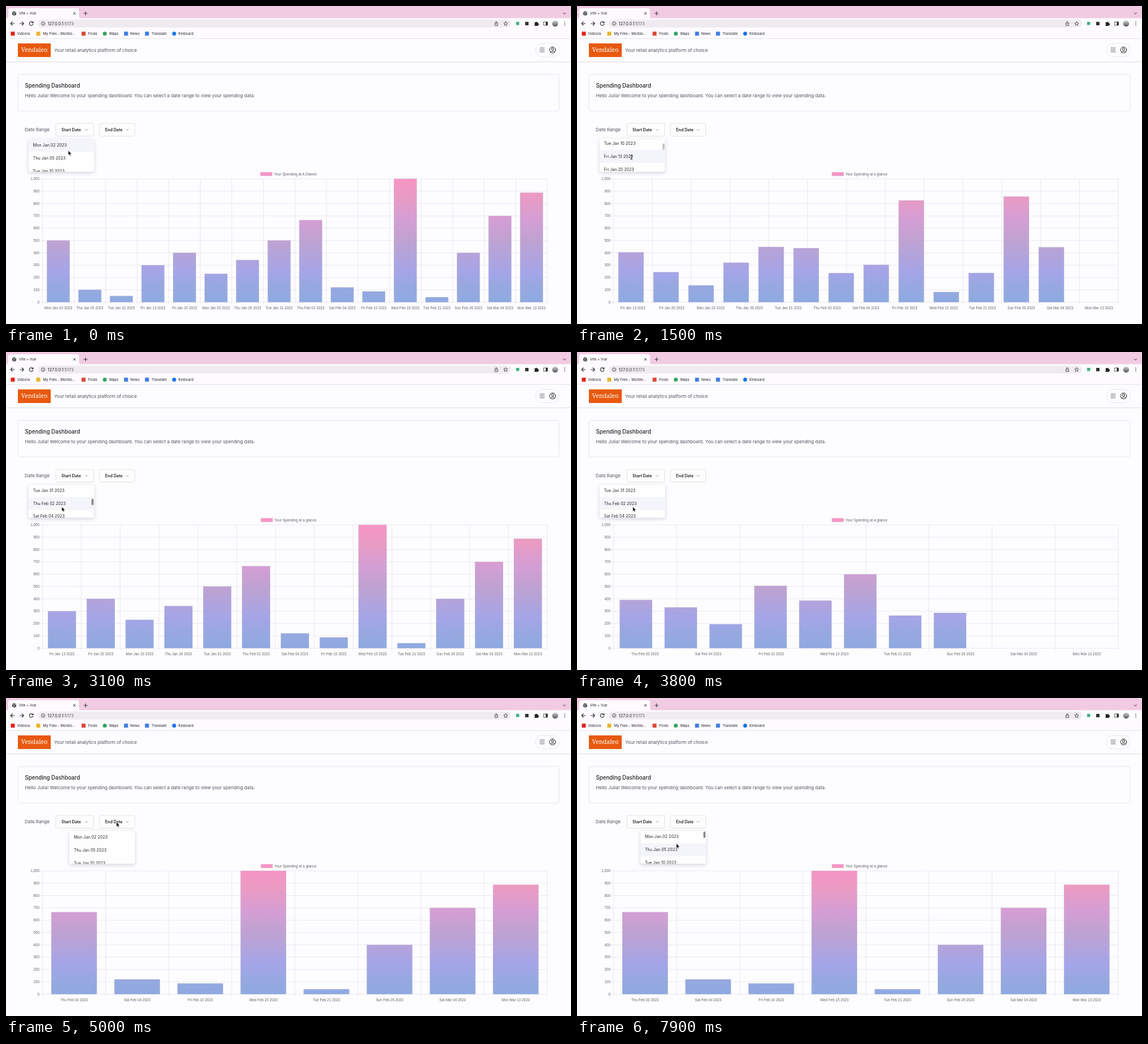
Write an HTML page that moves like this. It is 998 by 561 pixels and loops after 8 s.

```html
<!DOCTYPE html>
<html lang="en">
<head>
<meta charset="utf-8">
<title>Spending Dashboard</title>
<style>
  html, body { margin: 0; width: 100%; height: 100%; overflow: hidden; background: #fdfcff; }
  svg { display: block; font-family: Inter, "Open Sans", sans-serif; fill: #222; }
  .line { fill: none; stroke: #333; stroke-linecap: round; stroke-linejoin: round; }
  .chrome { font-size: 6.2px; }
  .body { font-size: 8.05px; fill: #50555f; }
  .button rect { fill: #fefdfd; stroke: #dddcd3; stroke-width: .8; }
  .button text { font-size: 7.15px; font-weight: 600; }
  .button path { stroke: #888; stroke-width: .8; }
  .menu text { font-size: 7.1px; }
  .panel { fill: #fefeff; filter: drop-shadow(0 2px 3px rgba(40, 40, 70, .2)); }
  .hover { fill: #f4f4fb; }
  .thumb { fill: #89878c; }
  .chart { font: 6.35px "Liberation Sans", Arial, sans-serif; }
  .chart text { fill: #666; }
  .grid { stroke: #dcdbe3; stroke-width: .6; }
  .bar { fill: url(#spend); stroke: #b4aec8; stroke-opacity: .55; stroke-width: .6; }
</style>
</head>
<body>
<svg id="stage" width="998" height="561" viewBox="0 0 998 561">
  <defs>
    <linearGradient id="spend" gradientUnits="userSpaceOnUse" x1="0" y1="305" x2="0" y2="522.5">
      <stop offset="0" stop-color="#f795c4"/>
      <stop offset=".14" stop-color="#ea9bc3"/>
      <stop offset=".34" stop-color="#d39ed5"/>
      <stop offset=".5" stop-color="#bfa2d1"/>
      <stop offset=".77" stop-color="#a3a5e8"/>
      <stop offset=".88" stop-color="#97a8df"/>
      <stop offset="1" stop-color="#8eaae1"/>
    </linearGradient>
    <linearGradient id="photo" x2="0" y2="1">
      <stop stop-color="#cfcfd2"/><stop offset="1" stop-color="#55565a"/>
    </linearGradient>
  </defs>

  <!-- browser -->
  <rect width="998" height="22" fill="#f1cbe2"/>
  <path d="M0 22Q4 22 4 18V8Q4 4 8 4H125Q129 4 129 8V18Q129 22 133 22Z" fill="#fdfbfe"/>
  <rect y="21.5" width="998" height="36" fill="#fdfbfe"/>
  <rect x="56" y="24" width="836" height="14" rx="7" fill="#efecf1"/>
  <path d="M0 57.5H998" stroke="#dfdde2" stroke-width=".8"/>
  <circle cx="14.5" cy="13" r="3.7" fill="#4a4b50"/>
  <path d="M12 11.5q2 0 2.500 1.800t-1 2.200M15 10q0 1.500 2.500 2" class="line" style="stroke:#fff;stroke-width:.8"/>
  <g class="line">
    <path d="M119 11.200l3.600 3.600m0-3.600l-3.600 3.600M137.500 13h6m-3-3v6M984 12l2.300 2.300 2.300-2.300"/>
    <path d="M14.800 31H8.200m3-3l-3 3 3 3M24.700 31h6.600m-3-3l3 3-3 3" stroke-width="1.200"/>
    <path d="M47.200 29a3.300 3.300 0 1 0 .6 2.800M48 27.500v2.200h-2.200" stroke-width="1.200"/>
    <g stroke-width=".8">
      <circle cx="65.500" cy="31" r="3.200"/><path d="M65.500 31v1.500m0-3v.1"/>
      <path d="M864.500 30h-1v4.500h5V30h-1M866 32.500v-5m-1.500 1.500l1.500-1.500 1.500 1.500"/>
      <path d="M882.600 27.500l1.100 2.300 2.500.3-1.900 1.700.6 2.500-2.300-1.300-2.300 1.300.6-2.500-1.900-1.700 2.500-.3z"/>
      <path d="M950 28h6.500v6H950z"/>
    </g>
  </g>
  <path d="M953.500 28h3v6h-3z"/>
  <rect x="901" y="28" width="5.500" height="5.500" fill="#3bb27f"/>
  <rect x="917" y="28" width="6" height="6" fill="#333"/>
  <path d="M933.500 29h2a1.200 1.200 0 1 1 2.400 0h2v2a1.200 1.200 0 1 1 0 2.300v1.700h-6.400v-2a1.200 1.200 0 0 0 0-2.300z"/>
  <circle cx="970" cy="31" r="5.300" fill="url(#photo)"/>
  <g fill="#333"><circle cx="987" cy="28.300" r=".8"/><circle cx="987" cy="31" r=".8"/><circle cx="987" cy="33.700" r=".8"/></g>
  <g class="chrome">
    <text x="23" y="15.300">Vite + Vue</text>
    <text x="73.500" y="33.700" font-size="7.350">127.0.0.1:<tspan fill="#5a5a60">5173</tspan></text>
    <g id="bookmarks"></g>
  </g>

  <!-- page -->
  <rect x="21" y="66" width="58" height="24" fill="#e8590f"/>
  <text x="50" y="81.300" text-anchor="middle" style="font:500 10.600px 'Noto Serif',serif;fill:#fff">Vendaleo</text>
  <text x="85" y="80.800" class="body">Your retail analytics platform of choice</text>
  <path d="M0 98.500H998" stroke="#d9d8dd" stroke-width=".9"/>
  <rect x="935.500" y="65.800" width="42" height="24" rx="12" fill="none" stroke="#e2e1e7" stroke-width=".8"/>
  <path d="M943 74.200h8M943 77.500h8M943 80.800h8" class="line" style="stroke:#555b66"/>
  <g class="line" style="stroke:#222"><circle cx="965.500" cy="77.500" r="5.300"/><circle cx="965.500" cy="76" r="2"/><path d="M961.800 81.200q3.700-3.600 7.400 0"/></g>
  <rect x="21" y="120.800" width="956" height="64.200" rx="3.500" fill="none" stroke="#e2e1e7" stroke-width=".9"/>
  <text x="33.500" y="143.700" font-size="9.700" font-weight="500">Spending Dashboard</text>
  <text x="33.500" y="160.800" class="body">Hello Julia! Welcome to your spending dashboard. You can select a date range to view your spending data.</text>
  <text x="33" y="221.200" class="body">Date Range</text>
  <g class="button">
    <rect x="88" y="207" width="67" height="22.500" rx="3"/><text x="98" y="220.700">Start Date</text>
    <path class="line" d="M139.800 217.300l2.300 2.300 2.300-2.300"/>
    <rect x="165" y="207" width="62.500" height="22.500" rx="3"/><text x="175" y="220.700">End Date</text>
    <path class="line" d="M211.800 217.300l2.300 2.300 2.300-2.300"/>
  </g>

  <g class="chart">
    <g id="axes"></g>
    <g id="bars"></g>
  </g>
  <g id="menus"></g>

  <g id="alert">
    <rect x="383" y="39" width="232" height="67" rx="2.500" fill="#fefdff" style="filter:drop-shadow(0 2px 4px rgba(0,0,0,.4))"/>
    <text x="391" y="55.500" font-size="7.900">127.0.0.1:5173 says</text>
    <text x="391" y="70.700" font-size="6.700">End date cannot be before start date</text>
    <rect x="574" y="82" width="33" height="16" rx="2" fill="#1d62de"/>
    <text x="590.500" y="92.300" font-size="6.500" font-weight="600" text-anchor="middle" fill="#fff">OK</text>
  </g>

  <g id="cursor">
    <path id="arrow" d="M0 0V8.300L1.900 6.600 3.200 9.500 4.600 8.900 3.300 6.100H5.900Z" fill="#000" stroke="#fff" stroke-width=".6"/>
    <path id="beam" class="line" stroke-width=".9" d="M-1.700-3.800Q0-3.800 0-2.600Q0-3.800 1.700-3.800M0-2.600V2.600M-1.700 3.800Q0 3.800 0 2.600Q0 3.800 1.700 3.800M-1 .8H1"/>
  </g>
</svg>
<script>
const LOOP = 8000, STEP = 100;
const LEFT = 64.5, WIDTH = 891.6, TOP = 305, BASE = 522.5;
const MENU_TOP = 234.5, MENU_H = 58, ROW = 22.85, ROW_TOP = 234.1;

const dates = ["Mon Jan 02", "Thu Jan 05", "Tue Jan 10", "Fri Jan 13", "Fri Jan 20", "Mon Jan 23",
  "Thu Jan 26", "Tue Jan 31", "Thu Feb 02", "Sat Feb 04", "Fri Feb 10", "Wed Feb 15", "Tue Feb 21",
  "Sun Feb 26", "Sat Mar 04", "Mon Mar 13"].map(d => d + " 2023");
const spend = [500, 100, 50, 300, 400, 230, 342, 500, 665, 120, 87, 1000, 40, 400, 700, 888];

// Each view shows the dates from one index on, starting at a given time.
const views = [{ from: 0, at: 0 }, { from: 3, at: 1350 }, { from: 8, at: 3731 }];

const $ = id => document.getElementById(id);
function add(parent, tag, attrs = {}, text) {
  const el = document.createElementNS("http://www.w3.org/2000/svg", tag);
  for (const k in attrs) el.setAttribute(k, attrs[k]);
  if (text) el.textContent = text;
  parent.append(el);
  return el;
}
const set = (el, attrs) => { for (const k in attrs) el.setAttribute(k, attrs[k]); };
const show = (el, on) => { el.style.display = on ? "" : "none"; };
const mix = (a, b, p) => a + (b - a) * p;

// Keys are [time, ...values]; values ease in and out between keys.
function track(keys, t) {
  const i = keys.findIndex(k => k[0] > t);
  if (i < 0) return keys.at(-1).slice(1);
  if (i === 0) return keys[0].slice(1);
  const a = keys[i - 1], b = keys[i], p = (t - a[0]) / (b[0] - a[0]);
  const e = p * p * (3 - 2 * p);
  return a.slice(1).map((v, j) => mix(v, b[j + 1], e));
}

// bookmarks: icon x, label x, label, icon colour, round?
[[12, 19.5, "Vidoora", "#e5201c"], [57, 65.5, "My Files - Morblo...", "#e9b52c"],
 [137, 145, "Posto", "#dd4437"], [174.5, 182.5, "Maps", "#35a462", 1], [212, 219.5, "News", "#3f7de0"],
 [249, 257, "Translate", "#3f7de0"], [297, 304.5, "Kinboard", "#1b74e8", 1]]
.forEach(([x, tx, label, fill, round]) => {
  add($("bookmarks"), "rect", { x: x - 3.5, y: 45.3, width: 7, height: 7, rx: round ? 3.5 : 0, fill });
  add($("bookmarks"), "text", { x: tx, y: 51.1 }, label);
});

function buildAxes({ from }, index) {
  const g = add($("axes"), "g"), n = dates.length - from, cat = WIDTH / n;
  for (let v = 0; v <= 1000; v += 100) {
    const y = BASE - v * (BASE - TOP) / 1000;
    add(g, "path", { d: `M60.500 ${y}H${LEFT + WIDTH}`, class: "grid" });
    add(g, "text", { x: 59, y: y + 2.2, "text-anchor": "end" }, v.toLocaleString("en-US"));
  }
  for (let i = 0; i <= n; i++) {
    const x = LEFT + cat * i;
    add(g, "path", { d: `M${x} ${TOP}V${BASE + 4}`, class: "grid" });
    if (i < n) add(g, "text", { x: x + cat / 2, y: 534.5, "text-anchor": "middle" }, dates[from + i]);
  }
  const shift = index ? .8 : 0;
  add(g, "rect", { x: 449.3 + shift, y: 293.2, width: 21, height: 6.6, fill: "#f396c3" });
  add(g, "text", { x: 473.3 + shift, y: 298.7 }, index ? "Your Spending at a glance" : "Your Spending at A Glance");
  return g;
}
const axes = views.map(buildAxes);
const bars = dates.map(() => add($("bars"), "rect", { class: "bar" }));

function barAt({ from }, i) {
  const cat = WIDTH / (dates.length - from);
  return [LEFT + cat * (i + .14), cat * .72, spend[from + i]];
}

function drawChart(t) {
  const now = views.findLastIndex(v => t >= v.at);
  const view = views[now], prev = views[Math.max(0, now - 1)];
  const p = 1 - (1 - Math.min(1, (t - view.at) / 1000)) ** 4;
  axes.forEach((g, i) => show(g, i === now));
  bars.forEach((bar, i) => {
    const visible = i < dates.length - view.from;
    show(bar, visible);
    if (!visible) return;
    const old = barAt(prev, i);
    const [x, width, v] = barAt(view, i).map((b, j) => now ? mix(old[j], b, p) : b);
    const height = v * (BASE - TOP) / 1000;
    set(bar, { x, width, y: BASE - height, height });
  });
}

function buildMenu(x, open, close, scroll, thumbFade) {
  const g = add($("menus"), "g", { class: "menu" }), id = "clip" + x;
  const box = { x, y: MENU_TOP, width: 115.8, height: MENU_H, rx: 3 };
  add(add(g, "clipPath", { id }), "rect", box);
  add(g, "rect", { ...box, class: "panel" });
  const view = add(g, "g", { "clip-path": `url(#${id})` });
  const list = add(view, "g");
  const hover = add(list, "rect", { x, width: 115.8, height: ROW, class: "hover" });
  dates.forEach((d, i) => add(list, "text", { x: x + 8, y: ROW_TOP + ROW * (i + .5) + 2.5 }, d));
  const thumb = add(view, "rect", { x: x + 111.3, width: 3.6, height: 11.5, rx: 1.8, class: "thumb" });
  return { x, g, list, hover, thumb, open, close, scroll, thumbFade };
}
const menus = [
  buildMenu(39.8, 0, 5000,
    [[300, 0], [1000, 48.8], [2400, 48.8], [3000, 161.3]],
    [[250, 0], [350, 1], [1400, 1], [1600, 0], [2350, 0], [2450, 1], [3300, 1], [3500, 0]]),
  buildMenu(112, 5000, LOOP, [[7750, 0], [7900, .6]], [[7750, 0], [7900, 1]])
];

const pointer = [[0, 110, 255], [300, 109, 256], [900, 96, 267], [2300, 96, 267], [3100, 98.5, 273],
  [4400, 98.5, 273], [4900, 195, 219], [5100, 195, 219], [5500, 184.5, 244.5], [6900, 184.5, 244.5],
  [7600, 175.5, 256.6]];

function drawMenus(t) {
  const [px, py] = track(pointer, t);
  let overText = false;
  for (const m of menus) {
    const isOpen = t >= m.open && t < m.close;
    show(m.g, isOpen);
    if (!isOpen) continue;
    const [s] = track(m.scroll, t);
    const pos = (py - ROW_TOP + s) / ROW, row = Math.floor(pos);
    const inside = py > MENU_TOP && py < MENU_TOP + MENU_H && px > m.x && px < m.x + 116;
    set(m.list, { transform: `translate(0 ${-s})` });
    set(m.hover, { y: ROW_TOP + row * ROW });
    show(m.hover, inside);
    set(m.thumb, { y: 235.3 + s * .145, opacity: track(m.thumbFade, t)[0] });
    overText = inside && px < m.x + 64 && Math.abs(pos - row - .5) * ROW < 5;
  }
  set($("cursor"), { transform: `translate(${px} ${py})` });
  show($("beam"), overText);
  show($("arrow"), !overText);
}

const start = performance.now();
function render(now) {
  const t = Math.floor(Math.max(0, now - start) % LOOP / STEP) * STEP;
  drawChart(t);
  drawMenus(t);
  show($("alert"), t >= 5700 && t < 6900);
  requestAnimationFrame(render);
}
render(start);
</script>
</body>
</html>
```
